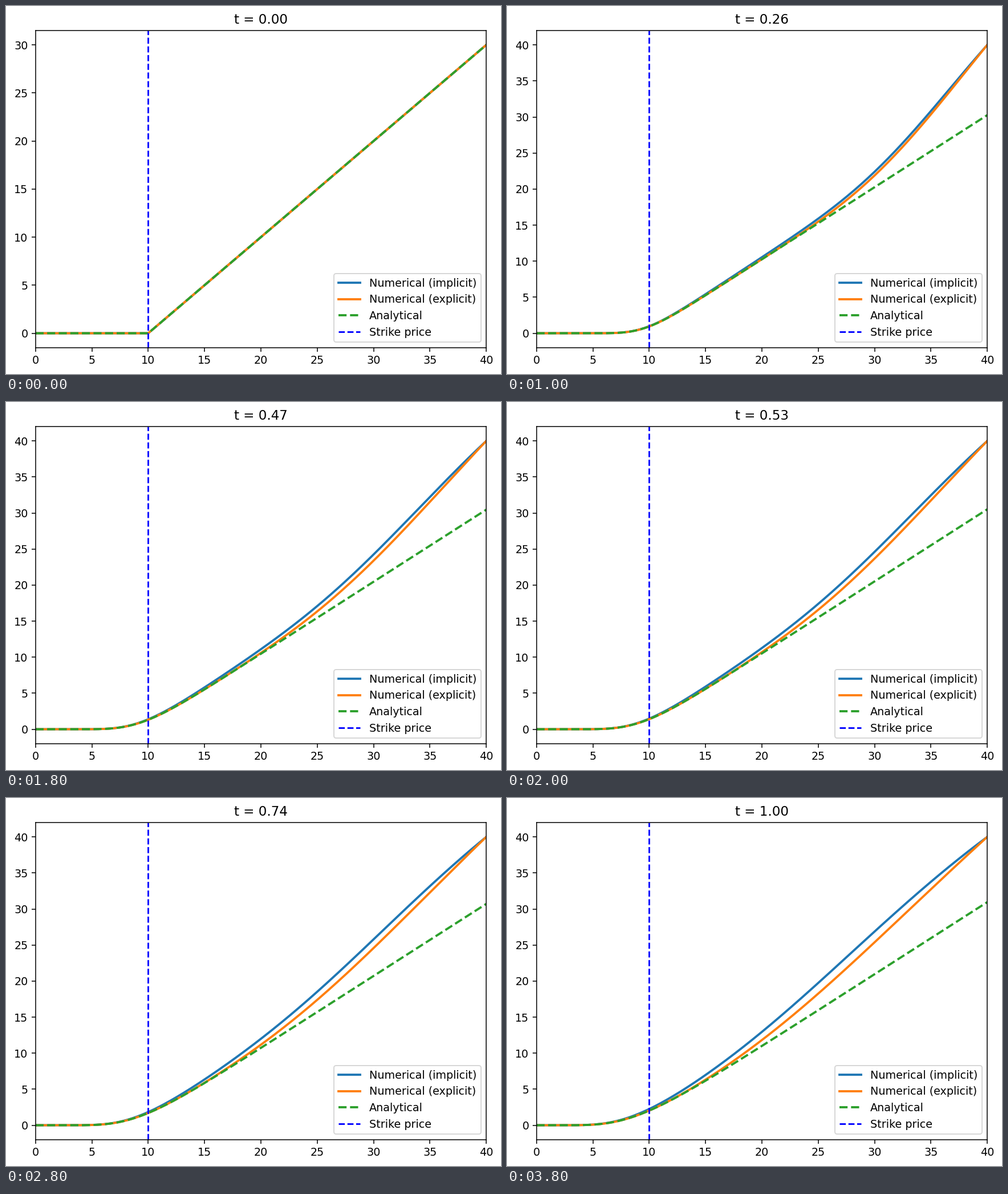
A matplotlib script that plays this animation: 868x645 px, repeating every 4 s.

```python
import math

import matplotlib.pyplot as plt
import numpy as np
from matplotlib.animation import FuncAnimation

W, H, DPI = 868, 645, 138
FRAMES, INTERVAL = 20, 200

K, RATE, SIGMA, S_MAX = 10, 0.1, 0.4, 40
CELLS = 200
S = np.linspace(0, S_MAX, CELLS + 1)
TIMES = np.linspace(0, 1, FRAMES)

norm_cdf = np.vectorize(lambda x: 0.5 * (1 + math.erf(x / math.sqrt(2))))


def payoff():
    return np.maximum(S - K, 0.0)


def analytical(t):
    if t == 0:
        return payoff()
    s = np.maximum(S, 1e-9)
    spread = SIGMA * math.sqrt(t)
    d1 = (np.log(s / K) + (RATE + SIGMA**2 / 2) * t) / spread
    return s * norm_cdf(d1) - K * math.exp(-RATE * t) * norm_cdf(d1 - spread)


def operator(discount):
    """Black-Scholes operator on the price grid; boundary rows stay zero."""
    j = np.arange(1, CELLS)
    diffusion, drift = SIGMA**2 * j**2 / 2, RATE * j / 2
    a = np.zeros((CELLS + 1, CELLS + 1))
    a[j, j - 1] = diffusion - drift
    a[j, j] = -2 * diffusion - discount
    a[j, j + 1] = diffusion + drift
    return a


def march(step, substeps):
    """Advance the payoff with V(S_MAX) = S_MAX held for t > 0."""
    v = payoff()
    history = [v]
    block = np.linalg.matrix_power(step, substeps)
    for _ in TIMES[1:]:
        v = v.copy()
        v[-1] = S_MAX
        v = block @ v
        history.append(v)
    return history


def time_step(substeps):
    return TIMES[1] / substeps


eye = np.eye(CELLS + 1)
# The implicit scheme carries no discount term, so it drifts upwards.
implicit = march(np.linalg.inv(eye - time_step(50) * operator(0)), 50)
explicit = march(eye + time_step(400) * operator(RATE), 400)
exact = [analytical(t) for t in TIMES]

plt.rcParams["font.family"] = "DejaVu Sans"
fig = plt.figure(figsize=((W + 1e-6) / DPI, (H + 1e-6) / DPI), dpi=DPI,
                 facecolor="white")
left, right, top, bottom = 51.8, 842.2, 42.9, 598.8
ax = fig.add_axes([left / W, 1 - bottom / H, (right - left) / W,
                   (bottom - top) / H])

curves = [
    (ax.plot([], [], color="C0", lw=2, label="Numerical (implicit)")[0], implicit),
    (ax.plot([], [], color="C1", lw=2, label="Numerical (explicit)")[0], explicit),
    (ax.plot([], [], "--", color="C2", lw=2, label="Analytical")[0], exact),
]
ax.axvline(K, color="blue", ls="--", lw=1.5, label="Strike price")
ax.set_xlim(0, S_MAX)
ax.set_xticks(range(0, S_MAX + 1, 5))
ax.legend(loc="lower right")
title = ax.set_title("")


def update(i):
    for line, history in curves:
        line.set_data(S, history[i])
    peak = round(implicit[i][-1])
    ax.set_ylim(-0.05 * peak, 1.05 * peak)
    ax.set_yticks(range(0, peak + 1, 5))
    title.set_text(f"t = {TIMES[i]:.2f}")


anim = FuncAnimation(fig, update, frames=FRAMES, init_func=lambda: update(0),
                     interval=INTERVAL, repeat=True, repeat_delay=0, blit=False)
plt.show()
```
